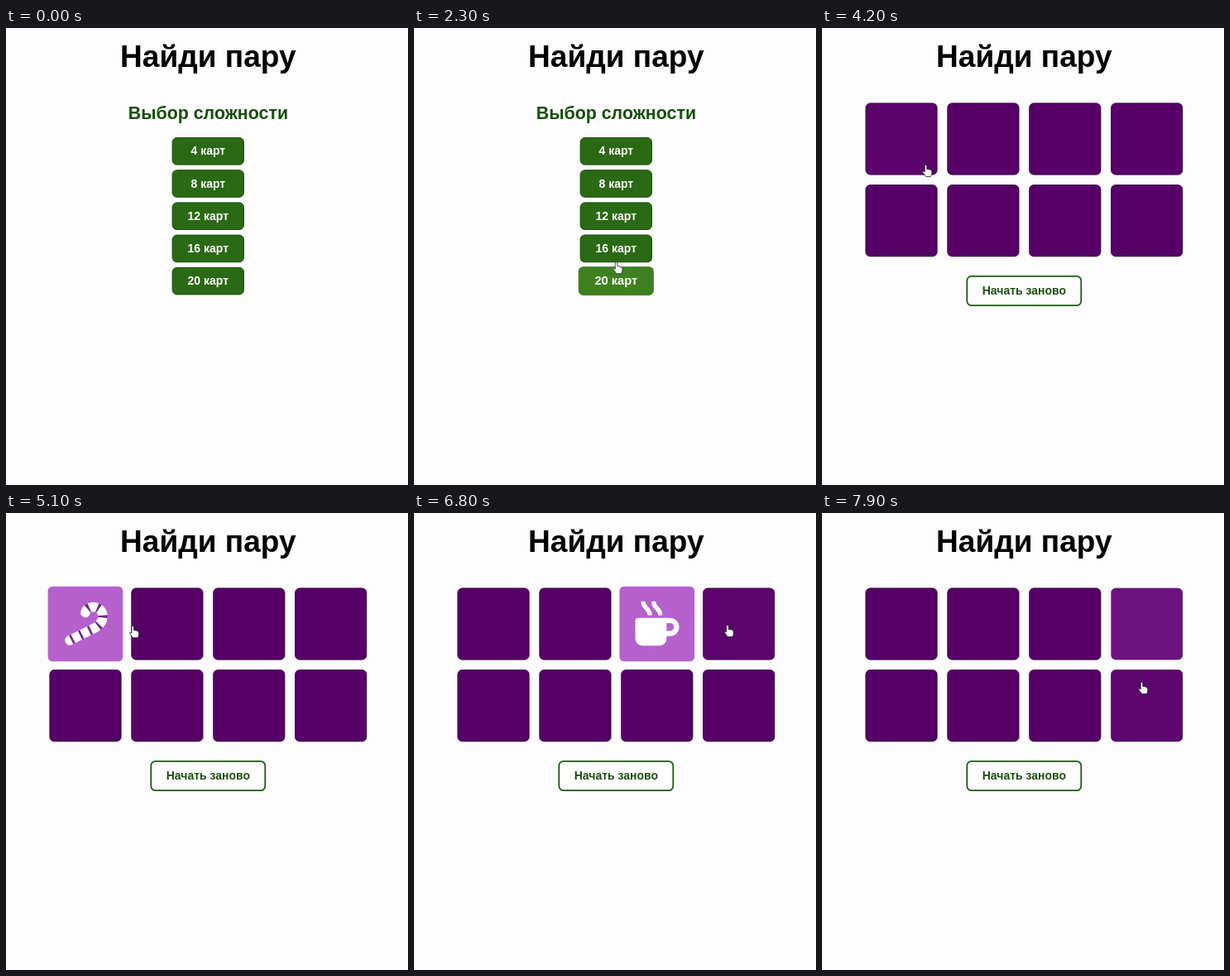
An HTML page for the animation above (8 s loop, 486x552 px).

```html
<!DOCTYPE html>
<html lang="ru">
<head>
<meta charset="utf-8">
<title>Найди пару</title>
<style>
  html, body { margin: 0; width: 100%; height: 100%; overflow: hidden; background: #fdfdfd; }
  svg { display: block; width: 486px; height: 552px; }
  text { font: bold 14px "Liberation Sans", Arial, sans-serif; text-anchor: middle; }
</style>
</head>
<body>
<svg viewBox="0 0 486 552">
  <defs>
    <path id="hook" d="M0-13C2-23 20-21 20-9Q20-1 12 4L-18 19"/>
    <g id="cane" fill="none" stroke-width="11">
      <use href="#hook" stroke="#fff" stroke-linecap="round"/>
      <use href="#hook" stroke="#6d2a86" stroke-dasharray="2.5 9" stroke-dashoffset="-5"/>
    </g>
    <g id="pizza" fill="#fff">
      <path d="M-13-25Q18-18 25 14L18 16Q11-11-14-17Z"/>
      <path d="M-15-14Q8-8 15 16L-23 25Z"/>
      <path d="M-9-6h0M-14 12h0M5 12h0" stroke="#6d2a86" stroke-width="8" stroke-linecap="round"/>
    </g>
    <g id="cup" fill="none" stroke="#fff">
      <path fill="#fff" stroke="none" d="M-22-7H11V17a8 8 0 0 1-8 8H-17a8 8 0 0 1-8-8V-4a3 3 0 0 1 3-3Z"/>
      <path stroke-width="6" d="M9-4h6a7.5 7.5 0 0 1 0 15H9"/>
      <path stroke-width="5" d="M-16-26c0 9 7 6 8 16M-4-26c0 9 7 6 8 16"/>
    </g>
  </defs>
  <text x="244.3" y="46.7" style="font-size:37.1px">Найди пару</text>
  <g id="menu">
    <text x="244.4" y="109.7" fill="#174f0c" style="font-size:21.4px">Выбор сложности</text>
  </g>
  <g id="board">
    <rect x="175.3" y="299.8" width="138" height="35.4" rx="5.5" fill="#fff" stroke="#1d5a10" stroke-width="1.8"/>
    <text x="244.4" y="322" fill="#1d4f10">Начать заново</text>
  </g>
  <g id="cursor" fill="#fff" stroke="#222" stroke-width=".8" stroke-linejoin="round">
    <path id="hand" d="M-1.3 7V1.2a1.3 1.3 0 0 1 2.6 0V5c3 0 6 1 6 3v2.5q0 1.5-1.5 3.5H0q-1-2-4-5.5q.3-2 2.7 0Z"/>
    <path id="arrow" d="M0 0V12l2.8-2.6 2 4.6 1.9-.8-2-4.5h3.8Z"/>
  </g>
</svg>
<script>
const LOOP = 8000, DEAL = 3700, FADE = 300, PEEK = 500;
const $ = id => document.getElementById(id);
const clamp = v => Math.min(1, Math.max(0, v));
const ease = u => { u = clamp(u); return u * u * (3 - 2 * u); };
const mix = (a, b, k) => a.map((v, i) => v + (b[i] - v) * k);
const rgb = c => `rgb(${c.map(Math.round)})`;

function add(parent, tag, attrs, text = '') {
  const el = document.createElementNS('http://www.w3.org/2000/svg', tag);
  for (const k in attrs) el.setAttribute(k, attrs[k]);
  el.textContent = text;
  return parent.appendChild(el);
}

// A rounded, outlined box centred on its own origin
function box(parent, cx, cy, w, h, stroke) {
  const g = add(parent, 'g', {});
  const rect = add(g, 'rect', { x: .5 - w / 2, y: .5 - h / 2, width: w - 1, height: h - 1, rx: 5.5, stroke });
  return { g, rect, cx, cy, w, h };
}

const buttons = Array.from({ length: 5 }, (_, i) => {
  const b = box($('menu'), 244.3, 148.8 + i * 39.2, 87.4, 33.6, '#1a4f0a');
  add(b.g, 'text', { y: 4.6, fill: '#fff' }, `${4 * i + 4} карт`);
  return b;
});

const icons = ['cane', 'pizza', 'cup', 'cane'];
const flips = [4600, 5190, 6400, 7080];
const cards = Array.from({ length: 8 }, (_, i) => {
  const c = box($('board'), 96 + i % 4 * 98.9, 134 + (i >> 2) * 98.7, 87.4, 87.4, '#2c0038');
  if (icons[i]) {
    c.up = flips[i];
    c.down = flips[i | 1] + PEEK; // a pair closes together
    c.icon = add(c.g, 'use', { href: '#' + icons[i] });
  }
  return c;
});

// Pointer stops: time, x, y
const path = [
  [100, 468, 430], [1300, 272, 366], [1600, 242.5, 311], [2000, 244, 309],
  [2960, 246.5, 196.5], [3700, 246.5, 196.5], [4120, 145, 183], [4200, 125.5, 165.5],
  [4500, 104, 140], [5000, 104, 140], [5190, 194, 134], [5900, 194, 134],
  [6250, 292, 135], [6650, 292, 135], [6800, 379, 135.5], [7650, 385, 140], [7900, 386.5, 204.5]
];

function pointer(t) {
  const i = path.findIndex(p => p[0] > t);
  const a = path.at(i - 1), b = path.at(i);
  return mix(a, b, ease((t - a[0]) / (b[0] - a[0]))).slice(1);
}

function over(o, t) {
  const [x, y] = pointer(t);
  return Math.abs(x - o.cx) < o.w / 2 && Math.abs(y - o.cy) < o.h / 2;
}

// Eased share of the last FADE ms spent under the pointer
function hover(o, t, from) {
  const steps = 20;
  let n = 0;
  for (let i = 0; i < steps; i++) {
    const s = t - i * FADE / steps;
    if (s >= from && over(o, s)) n++;
  }
  return ease(n / steps);
}

function drawButton(b, t) {
  const h = hover(b, t, 100);
  b.g.setAttribute('transform', `translate(${b.cx} ${b.cy}) scale(${1 + .05 * h})`);
  b.rect.setAttribute('fill', rgb(mix([42, 106, 20], [64, 131, 31], h)));
  b.rect.setAttribute('stroke-opacity', 1 - .6 * h);
}

function drawCard(c, t) {
  const h = hover(c, t, DEAL);
  const p = c.icon ? ease((t - c.up) / FADE) - ease((t - c.down) / FADE) : 0;
  const size = 1 + .05 * p, turn = Math.abs(Math.cos(p * Math.PI));
  c.g.setAttribute('transform', `translate(${c.cx} ${c.cy}) scale(${size * turn} ${size})`);
  const back = mix([86, 0, 103], [120, 30, 143], h);
  c.rect.setAttribute('fill', rgb(mix(back, [182, 96, 205], p)));
  c.rect.setAttribute('stroke-opacity', .7 * (1 - p) * (1 - h));
  if (c.icon) c.icon.setAttribute('opacity', p);
}

function frame(now) {
  const t = now % LOOP, dealt = t >= DEAL;
  const show = (id, on) => $(id).setAttribute('display', on ? 'inline' : 'none');
  show('menu', !dealt);
  show('board', dealt);
  const items = dealt ? cards : buttons;
  items.forEach(o => (dealt ? drawCard : drawButton)(o, t));

  const onItem = items.some(o => over(o, t));
  show('cursor', t >= 100);
  show('hand', onItem);
  show('arrow', !onItem);
  $('cursor').setAttribute('transform', `translate(${pointer(t)})`);
  requestAnimationFrame(frame);
}
frame(performance.now());
</script>
</body>
</html>
```
